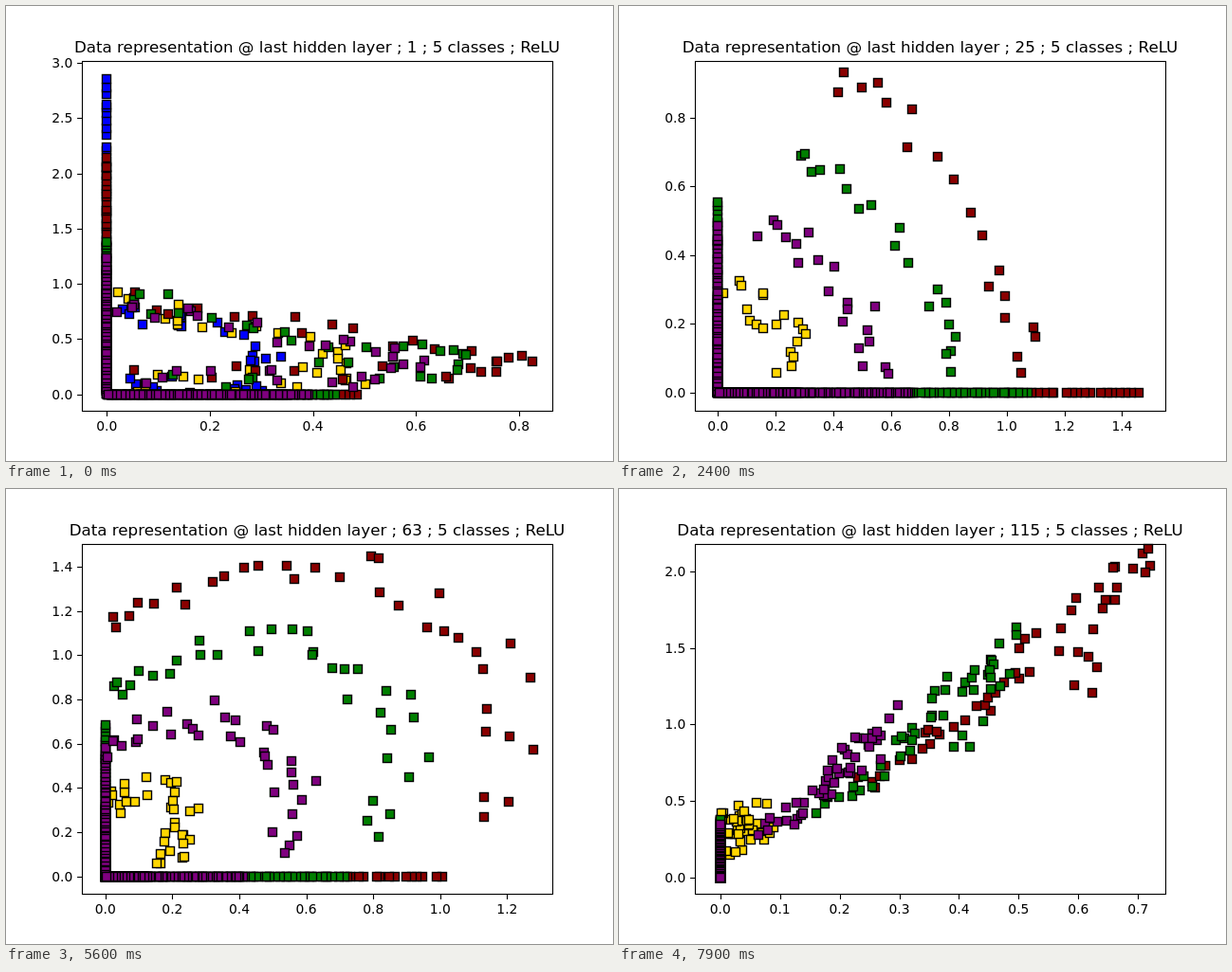
Animation of 640x480 px, one loop 8 s. Source, as an HTML page:

```html
<!DOCTYPE html>
<html lang="en">
<head>
<meta charset="utf-8">
<title>Hidden layer scatter</title>
<style>
  html, body { margin: 0; width: 100%; height: 100%; overflow: hidden; background: #fff; }
  svg { display: block; width: 640px; height: 480px; }
  text { font-family: "DejaVu Sans", sans-serif; font-size: 13.89px; fill: #000; }
  #title { font-size: 16.7px; text-anchor: middle; }
  #frame, #ticks path { fill: none; stroke: #000; stroke-width: 1.11; }
  #dots rect { stroke: #000; stroke-width: 1.39; }
</style>
</head>
<body>
<svg viewBox="0 0 640 480">
  <g id="dots"></g>
  <g id="ticks"></g>
  <rect id="frame" x="80.5" y="58.5" width="496" height="369"/>
  <text id="title" x="328" y="49"></text>
</svg>
<script>
const STEP = 100, STEPS = 80;
const RING = 80, STEM = 45; // dots per class: on its arc, on the y axis
const BOX = { left: 80, right: 576, top: 57.6, bottom: 427.2 };
const EPOCHS = [[0, 1], [4900, 50], [5600, 63], [6400, 77], [7900, 115]];

// time, x of zero, px per x unit, y of zero, px per y unit
const AXES = [
  [0, 106.3, 543.4, 409.5, 116.5], [900, 104.5, 260, 401, 1700],
  [1000, 104.3, 235, 400, 1680], [1100, 104.2, 220.6, 399.7, 1277],
  [2400, 104.4, 304.3, 407.5, 361.9], [4400, 104.5, 289.7, 408, 298.5],
  [5600, 104.8, 353, 408.5, 233.2], [6400, 105.2, 440, 408.8, 204.5],
  [7200, 106, 545, 409.3, 164.4], [7900, 106.7, 629.4, 409.7, 161.3]
];

// level: place between the inner (0) and outer (1) arc
// stem: height on the y axis as a share of the arc's start; first: same in px at time 0
const classes = [
  { color: '#0000ff', level: -.5, stem: .1, first: 334 },
  { color: '#ffd700', level: 0, stem: 1, first: 100 },
  { color: '#8b0000', level: 1, stem: .05, first: 250 },
  { color: '#008000', level: .67, stem: .8, first: 162 },
  { color: '#800080', level: .33, stem: 1, first: 144 }
];

// free: share of dots off the axes; reach: end of the x axis row, inner and outer
const poses = [
  { t: 0, free: .4, noise: 26, reach: [300, 370],
    inner: [117,314, 200,332, 325,357, 360,388, 260,395, 131,396],
    outer: [117,306, 250,328, 440,360, 545,372, 400,384, 141,388] },
  { t: 1100, free: .13, noise: 5, reach: [200, 552],
    inner: [107,305, 124,317, 133,324, 137,335, 143,370, 148,391],
    outer: [178,88, 192,108, 209,160, 229,212, 265,335, 283,363] },
  { t: 2400, free: .24, noise: 6, reach: [190, 552],
    inner: [110,305, 142,303, 155,330, 173,338, 181,362, 183,387],
    outer: [222,82, 270,97, 325,160, 398,271, 419,336, 440,392] },
  { t: 4400, free: .31, noise: 8, reach: [175, 525],
    inner: [106,313, 128,325, 150,317, 168,350, 185,370, 203,394],
    outer: [111,97, 200,86, 292,87, 392,175, 475,280, 548,396] },
  { t: 5600, free: .42, noise: 10, reach: [150, 465],
    inner: [108,335, 130,319, 165,326, 185,348, 188,372, 178,395],
    outer: [105,146, 190,114, 331,78, 449,123, 535,210, 505,352] },
  { t: 6400, free: .48, noise: 10, reach: [140, 480],
    inner: [110,340, 125,332, 160,334, 170,350, 158,368, 143,402],
    outer: [157,195, 264,123, 375,88, 500,110, 535,190, 465,395] },
  { t: 7900, free: .62, noise: 24, reach: [107, 107],
    inner: [115,375, 128,372, 138,355, 133,345, 120,346, 114,360],
    outer: [250,312, 330,268, 405,205, 478,130, 545,85, 465,225] }
];

let seed = 7;
const rand = () => (seed = (seed * 16807) % 2147483647) / 2147483647;
const wobble = () => rand() - .5;
const mix = (a, b, k) => a + (b - a) * k;
const mixLog = (a, b, k) => a * Math.pow(b / a, k);
const $ = id => document.getElementById(id);

function locate(times, t) {
  let i = 0;
  while (i < times.length - 2 && t >= times[i + 1]) i++;
  return [i, (t - times[i]) / (times[i + 1] - times[i])];
}

// Catmull-Rom through a flat list of points; axis 0 is x, 1 is y
function along(pts, u, axis) {
  const last = pts.length / 2 - 1, s = u * last;
  const i = Math.min(last - 1, Math.floor(s)), f = s - i;
  const p = k => pts[2 * Math.max(0, Math.min(last, k)) + axis];
  const [a, b, c, d] = [p(i - 1), p(i), p(i + 1), p(i + 2)];
  return b + f / 2 * (c - a + f * (2 * a - 5 * b + 4 * c - d + f * (3 * (b - c) + d - a)));
}

function addDot(color) {
  const r = document.createElementNS('http://www.w3.org/2000/svg', 'rect');
  r.setAttribute('width', 9);
  r.setAttribute('height', 9);
  r.setAttribute('fill', color);
  return $('dots').appendChild(r);
}

function place(dot, x, y) {
  dot.setAttribute('x', Math.round(x) - 4.5);
  dot.setAttribute('y', Math.round(y) - 4.5);
}

for (const c of classes) {
  const row = n => Array.from({ length: n }, (_, i) => ({
    u: (i + rand()) / n, shift: wobble() * .16, jitter: [wobble(), wobble()], dot: addDot(c.color)
  }));
  c.stemDots = row(STEM);
  c.ringDots = row(RING);
}

function ringSpot(c, d, pose, x0, y0) {
  const { free, noise, reach, inner, outer } = pose;
  if (d.u >= free) {
    const end = mix(reach[0], reach[1], Math.max(0, c.level));
    return [mix(end, x0, (d.u - free) / (1 - free)), y0];
  }
  const [x, y] = [0, 1].map(axis =>
    mix(along(inner, d.u / free, axis), along(outer, d.u / free, axis), c.level + d.shift) + d.jitter[axis] * noise);
  return [Math.max(x0, x), Math.min(y0, y)];
}

function stemHeight(c, pose, y0) {
  return pose.t ? c.stem * (y0 - mix(pose.inner[1], pose.outer[1], Math.max(0, c.level))) : c.first;
}

function drawDots(t, x0, y0) {
  const [k, f] = locate(poses.map(p => p.t), t);
  const from = poses[k], to = poses[k + 1];
  for (const c of classes) {
    const height = mix(stemHeight(c, from, y0), stemHeight(c, to, y0), f);
    for (const d of c.stemDots) place(d.dot, x0, y0 - height * d.u);
    for (const d of c.ringDots) {
      const a = ringSpot(c, d, from, x0, y0), b = ringSpot(c, d, to, x0, y0);
      place(d.dot, mix(a[0], b[0], f), mix(a[1], b[1], f));
    }
  }
}

// Round tick values between lo and hi, at most nine intervals
function tickValues(lo, hi) {
  const raw = (hi - lo) / 9, pow = Math.pow(10, Math.floor(Math.log10(raw)));
  const step = +([1, 2, 2.5, 5, 10].find(s => s * pow >= raw) * pow).toPrecision(3);
  const digits = (String(step).split('.')[1] || '0').length, out = [];
  for (let i = Math.ceil(lo / step); i * step <= hi; i++)
    out.push([i * step, Math.abs(i * step).toFixed(digits)]);
  return out;
}

function drawTicks(x0, sx, y0, sy) {
  let svg = '';
  for (const [v, label] of tickValues((BOX.left - x0) / sx, (BOX.right - x0) / sx)) {
    const x = x0 + v * sx;
    svg += `<path d="M${Math.round(x) + .5} 428v4.9"/><text x="${x}" y="448" text-anchor="middle">${label}</text>`;
  }
  for (const [v, label] of tickValues((y0 - BOX.bottom) / sy, (y0 - BOX.top) / sy)) {
    const y = Math.round(y0 - v * sy);
    svg += `<path d="M80 ${y + .5}h-4.9"/><text x="70.3" y="${y + 5}" text-anchor="end">${label}</text>`;
  }
  $('ticks').innerHTML = svg;
}

function draw(t) {
  const [e, ef] = locate(EPOCHS.map(p => p[0]), t);
  const epoch = Math.round(mix(EPOCHS[e][1], EPOCHS[e + 1][1], ef));
  $('title').textContent = `Data representation @ last hidden layer ; ${epoch} ; 5 classes ; ReLU`;
  const [a, af] = locate(AXES.map(p => p[0]), t);
  const [, x0, sx, y0, sy] = AXES[a].map((v, i) => (i % 2 ? mix : mixLog)(v, AXES[a + 1][i], af));
  drawTicks(x0, sx, y0, sy);
  drawDots(t, x0, y0);
}

const start = performance.now();
let shown = -1;
function tick() {
  const n = Math.floor((performance.now() - start) / STEP) % STEPS;
  if (n !== shown) draw((shown = n) * STEP);
  requestAnimationFrame(tick);
}
tick();
</script>
</body>
</html>
```
